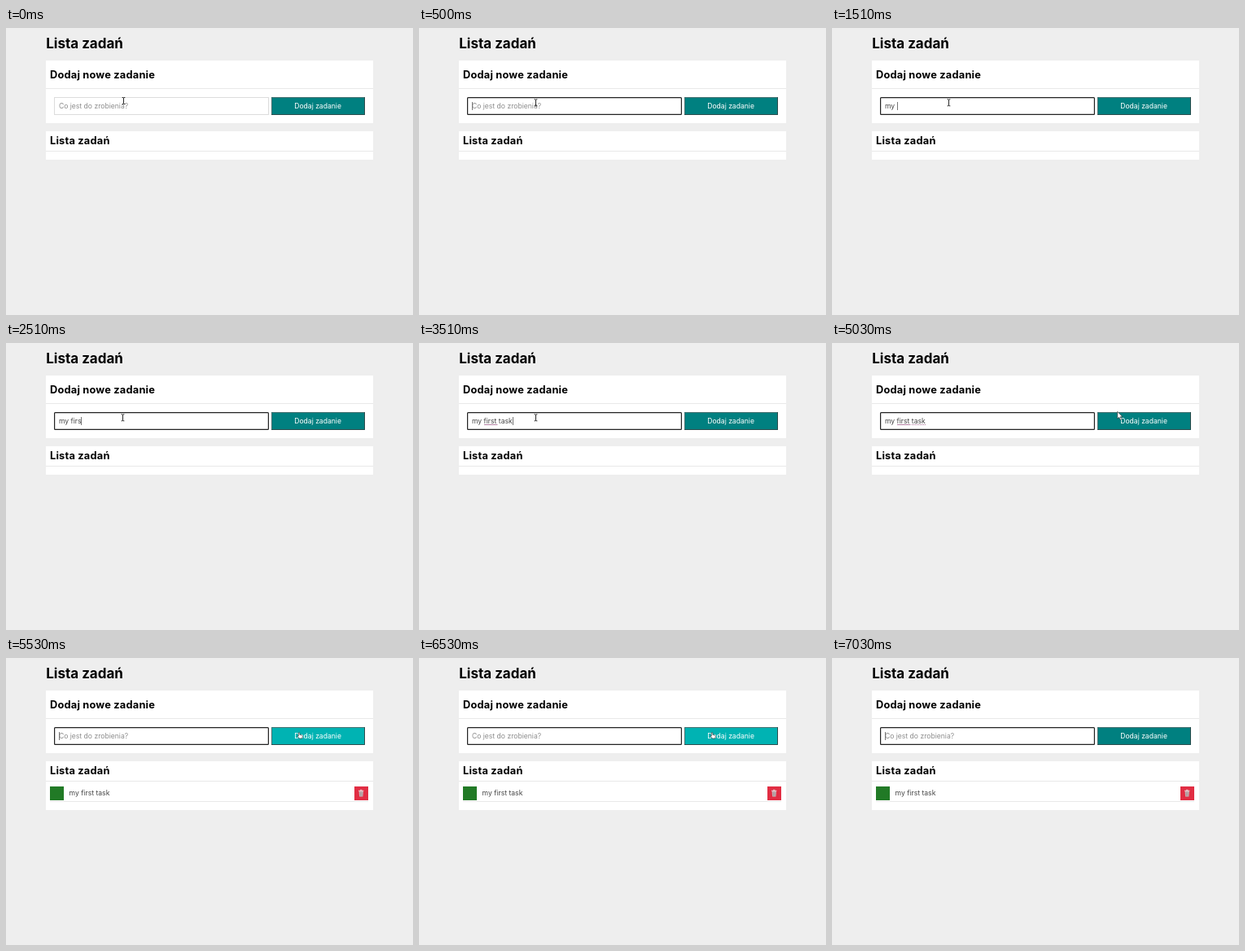
Animation of 500x353 px, one loop 7.54 s. Source, as an HTML page:

```html
<!DOCTYPE html>
<html lang="pl">
<head>
<meta charset="utf-8">
<title>Lista zadań</title>
<style>
  html, body { margin: 0; width: 100%; height: 100%; overflow: hidden; background: #eee; }
  svg { display: block; width: 500px; height: 353px; }
  text { font-family: Inter, "Open Sans", sans-serif; font-size: 8.6px; fill: #444; }
  .title { font-size: 17px; font-weight: 700; fill: #000; }
  .heading { font-size: 12.8px; font-weight: 700; letter-spacing: .016em; fill: #000; }
  .card { fill: #fff; }
  .rule { fill: #e9e9e9; }
  #hint { fill: #8c8c8c; }
  #button { fill: #008080; }
  #button.hover { fill: #00b3b3; }
  .label { fill: #fff; }
  .spell { stroke: #a2628d; stroke-width: .8; }
  .outline { stroke: #222; stroke-width: .6; stroke-linejoin: round; fill: #fff; }
</style>
</head>
<body>
<svg viewBox="0 0 500 353">
  <rect width="500" height="353" fill="#eee"/>
  <text class="title" x="49.2" y="25.3">Lista zadań</text>

  <rect class="card" x="49" y="40" width="402" height="77"/>
  <text class="heading" x="54" y="61.6">Dodaj nowe zadanie</text>
  <rect class="rule" x="49" y="74" width="402" height="1"/>
  <rect x="59.5" y="85.5" width="263" height="21" fill="#fff" stroke="#dcdcdc"/>
  <rect id="focus" x="59.6" y="85.6" width="262.8" height="20.8" rx="1" fill="#fff" stroke="#222" stroke-width="1.2"/>
  <text id="hint" x="64.9" y="98.7">Co jest do zrobienia?</text>
  <text id="value" x="64.9" y="98.7"></text>
  <path id="spellFirst" class="spell" d="M80 100.5H96.5"/>
  <path id="spellTask" class="spell" d="M98 100.5H115" stroke-dasharray="1.2 .8"/>
  <rect id="caret" y="91" width="1" height="10" fill="#777"/>

  <rect id="button" x="326" y="85" width="115" height="22"/>
  <path d="M326.5 107V85.5H441" fill="none" stroke="#436f6f"/>
  <path d="M326 106.5H440.5V85" fill="none" stroke="#2b4c4c"/>
  <text class="label" x="354.2" y="98.7">Dodaj zadanie</text>

  <rect id="list" class="card" x="49" y="127" width="402" height="35"/>
  <text class="heading" x="54" y="143.4">Lista zadań</text>
  <rect class="rule" x="49" y="151" width="402" height="1"/>
  <g id="item">
    <rect x="54" y="158" width="17" height="17" fill="#217a26"/>
    <text x="77.5" y="169.2">my first task</text>
    <rect x="428" y="158" width="17" height="17" fill="#e12d43"/>
    <path d="M433.6 164H438.9L438.4 170.5H434.1Z" fill="#c9b9bb"/>
    <path d="M433 163.3H439.4M435 162.4H437.4" stroke="#e6d8d9"/>
    <path d="M435.3 165V169.8M437.1 165V169.8" stroke="#8d6f73" stroke-width=".6"/>
    <rect class="rule" x="54" y="176" width="391" height="1"/>
  </g>

  <path id="beam" d="M-1.8-4H-.5L0-3.5L.5-4H1.8M0-3.5V3.5M-1.8 4H-.5L0 3.5L.5 4H1.8" fill="none" stroke="#111" stroke-width=".9"/>
  <path id="arrow" class="outline" d="M0 0V8.8L2 7L3.4 10.2L4.9 9.5L3.5 6.5H6.2Z"/>
  <path id="hand" class="outline" d="M0 .8Q.8-.4 1.6.8V3.2L4.3 3.9Q5.2 4.2 5 5.3L4.4 7.8H1L-1.2 5Q-1 4 0 4.8Z"/>
</svg>
<script>
const LOOP = 7540;
const el = id => document.getElementById(id);
const show = (id, on) => el(id).setAttribute("visibility", on ? "visible" : "hidden");

const beam = ["beam", 143.5, 91.8];
const first = { focus: true, text: "my first task", spell: 1, pointer: beam };
const done = { focus: true, text: "", caret: 65, added: true };
const hover = { ...done, hover: true, pointer: ["hand", 359.3, 91.2] };

// Each step holds until the next one starts.
const steps = [
  { at: 0, text: "", pointer: ["beam", 144.5, 89.5] },
  { at: 500, focus: true, text: "", caret: 65, pointer: beam },
  { at: 990, focus: true, text: "", pointer: beam },
  { at: 1510, focus: true, text: "my", caret: 80, pointer: beam },
  { at: 2010, focus: true, text: "my f", caret: 83, pointer: beam },
  { at: 2510, focus: true, text: "my firs", caret: 92, pointer: beam },
  { at: 3010, focus: true, text: "my first", caret: 98, spell: 1, pointer: beam },
  { at: 3510, ...first, caret: 115 },
  { at: 4030, ...first },
  { at: 4530, ...first, caret: 115, spell: 2, pointer: ["arrow", 175.5, 46.5] },
  { at: 5030, ...first, spell: 2, pointer: ["arrow", 350.7, 84.3] },
  { at: 5530, ...hover },
  { at: 6530, ...hover, caret: 0 },
  { at: 7030, ...done }
];

function render(step) {
  const { text, caret, spell = 0, pointer = [] } = step;
  const [shape, x, y] = pointer;
  show("focus", step.focus);
  show("hint", !text);
  el("value").textContent = text;
  show("caret", caret);
  el("caret").setAttribute("x", caret || 0);
  show("spellFirst", spell > 0);
  show("spellTask", spell > 1);
  el("button").classList.toggle("hover", !!step.hover);
  show("item", step.added);
  el("list").setAttribute("height", step.added ? 60 : 35);
  for (const id of ["beam", "arrow", "hand"]) show(id, id === shape);
  if (shape) el(shape).setAttribute("transform", `translate(${x} ${y})`);
}

const start = performance.now();
let current;
function tick() {
  const time = (performance.now() - start) % LOOP;
  const step = steps.findLast(s => s.at <= time);
  if (step !== current) render(current = step);
  requestAnimationFrame(tick);
}
tick();
</script>
</body>
</html>
```
